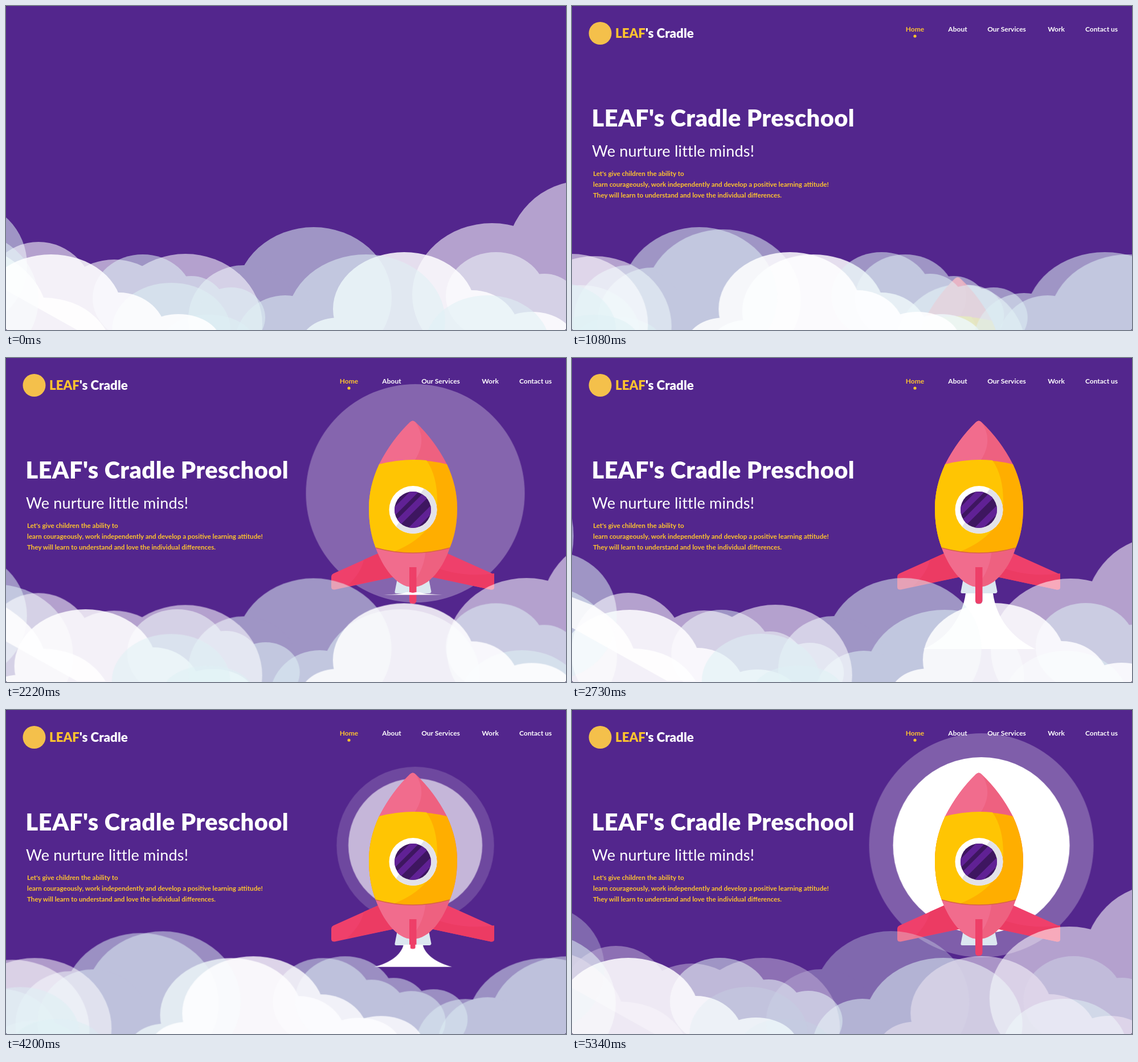
Write an HTML page without scripts that moves like this. It is 983x570 px and loops after 5.37 s.

```html
<!DOCTYPE html>
<html lang="en">
<head>
<meta charset="utf-8">
<title>Preschool hero</title>
<style>
html, body { margin: 0; width: 100%; height: 100%; overflow: hidden; background: #3a2a4a; }
svg { display: block; width: 983px; height: 570px; border-radius: 3px; background: #53268d; }
text { font-family: Lato, "Open Sans", sans-serif; fill: #fff; }
.gold { fill: #ffc42e; }
.brand { font-size: 22.3px; font-weight: 900; }
.nav { font-size: 12px; font-weight: 700; text-anchor: middle; }
.title { font-size: 41.5px; font-weight: 900; letter-spacing: .45px; }
.tagline { font-size: 27px; font-weight: 400; letter-spacing: .2px; }
.copy { font-size: 11.6px; font-weight: 700; }
.mist { fill: #dff0f5; opacity: .55; }
.blush { fill: #fff; opacity: .57; }
.puff { fill: #fff; opacity: .85; }

.copyblock, .badge, .ship, .halo, .core, .flame, .wide, .far, .under, .over {
  animation: 5370ms linear infinite;
}
.copyblock { animation-name: show; }
.badge { animation-name: badge; }
.ship { animation-name: rise; }
.halo { animation-name: halo; }
.core { animation-name: core; }
.flame { animation-name: burn; transform-origin: 714px 412px; }
.wide { animation-name: drift-wide; }
.far { animation-name: drift-far; }
.halo, .core { transform-origin: 718.5px 238px; }
/* the wide bank starts behind the far one, then moves in front */
.under { animation-name: leave; }
.over { animation-name: enter; }

@keyframes leave { 0%, 10% { visibility: visible; } 10.01%, 100% { visibility: hidden; } }
@keyframes enter { 0%, 10% { visibility: hidden; } 10.01%, 100% { visibility: visible; } }
@keyframes show { 0%, 1.67% { opacity: 0; } 11%, 100% { opacity: 1; } }
@keyframes badge { 0%, 11% { opacity: 0; } 16%, 100% { opacity: 1; } }
@keyframes rise {
  0%, 13% { transform: translate(-50px, 494px); }
  20.11% { transform: translate(-37px, 367px); }
  34.08% { transform: translate(-12px, 122px); }
  41%, 100% { transform: none; }
}
/* halo and core have a radius of 100, so scale reads as radius */
@keyframes halo {
  0%, 13% { transform: scale(.8); opacity: .6; }
  20.11% { transform: scale(1.15); opacity: .6; }
  34.08% { transform: scale(1.74); opacity: .66; }
  41.3% { transform: scale(1.92); opacity: .3; }
  48.5% { transform: scale(1.97); opacity: 0; }
  48.6%, 73.2% { transform: scale(.6); opacity: 0; }
  81.5% { transform: scale(1.89); opacity: .27; }
  84% { transform: scale(1.97); opacity: .26; }
  89.94% { transform: scale(1.26); opacity: 0; }
  99.44%, 100% { transform: scale(1.97); opacity: .26; }
}
@keyframes core {
  0%, 73.2% { transform: scale(.6); opacity: 0; }
  81.5% { transform: scale(1.55); opacity: 1; }
  89.94% { transform: scale(1.26); opacity: .71; }
  99.44%, 100% { transform: scale(1.55); opacity: 1; }
}
@keyframes burn {
  0%, 41% { transform: scale(.5, 0); }
  48.5%, 72.6% { transform: none; }
  82%, 100% { transform: scale(.5, 0); }
}
@keyframes drift-wide {
  0%, 1.67% { transform: translate(540px, 0); }
  20.11% { transform: translate(223px, 0); }
  34.08% { transform: translate(442px, -1px); }
  47.86% { transform: translate(627px, -2px); }
  50.84% { transform: translate(582px, -2px); }
  65.36% { transform: translate(392px, -1px); }
  76.13% { transform: translate(247px, 0); opacity: 1; }
  89.94% { transform: translate(433px, 2px); opacity: .65; }
  99.44% { transform: translate(560px, 0); opacity: .6; }
  100% { transform: translate(567px, 0); opacity: .6; }
}
@keyframes drift-far {
  0%, 1.67% { transform: translate(-80px, 4px); }
  20.11% { transform: translate(265px, 4px); }
  34.08% { transform: translate(72px, 8px); }
  47.86% { transform: translate(-101px, 10px); }
  50.84% { transform: translate(-58px, 10px); opacity: 1; }
  65.36% { transform: translate(130px, 7px); opacity: .85; }
  76.13% { transform: translate(266px, 4px); opacity: .95; }
  89.94% { transform: translate(72px, 0); opacity: 1; }
  99.44% { transform: translate(-60px, 3px); }
  100% { transform: translate(-67px, 3px); }
}
</style>
</head>
<body>
<svg viewBox="0 0 983 570" xmlns="http://www.w3.org/2000/svg">
  <defs>
    <clipPath id="pane"><circle cx="714" cy="267" r="32"/></clipPath>
    <clipPath id="rim"><circle cx="714.5" cy="267" r="42"/></clipPath>
    <clipPath id="hull">
      <path d="M709 113Q714 108 719 113Q752 144 774 187Q792 226 792 264Q792 303 779 334C768 367 744 403 714 403C685 403 661 367 649 334Q637 303 637 264Q637 226 655 187Q677 144 709 113Z"/>
    </clipPath>
    <path id="fin" d="M655 343L575 379Q571 381 571 385V403Q571 408 577 407.500L682 385Z" fill="#ef406b"/>

    <!-- one cloud bank; x is measured from the tallest middle cloud -->
    <g id="bank">
      <circle class="mist" cx="-735" cy="315" r="156"/>
      <circle class="mist" cx="-615" cy="455" r="112"/>
      <g class="mist">
        <ellipse cy="513" rx="137" ry="124"/>
        <ellipse cx="-122" cy="550" rx="98" ry="94"/>
      </g>
      <g class="blush">
        <ellipse cx="-225" cy="560" rx="135" ry="124"/>
        <ellipse cx="-350" cy="545" rx="105" ry="99"/>
        <ellipse cx="-483" cy="520" rx="100" ry="105"/>
      </g>
      <g class="blush">
        <ellipse cx="933" cy="504" rx="140" ry="126"/>
        <circle cx="1095" cy="440" r="137"/>
      </g>
      <g class="mist">
        <ellipse cx="320" cy="510" rx="88" ry="77"/>
        <ellipse cx="405" cy="530" rx="62" ry="59"/>
        <ellipse cx="475" cy="544" rx="60" ry="53"/>
      </g>
      <g class="mist">
        <ellipse cx="712" cy="550" rx="139" ry="117"/>
        <ellipse cx="570" cy="590" rx="88" ry="85"/>
      </g>
      <ellipse class="mist" cx="925" cy="595" rx="110" ry="90"/>
      <ellipse class="mist" cx="-250" cy="570" rx="104" ry="83"/>
      <ellipse class="mist" cx="-185" cy="590" rx="80" ry="47"/>
      <path class="puff" d="M-640 444L-415 570H-365Q-400 515 -474 513Q-490 470 -545 437L-640 400Z"/>
      <g class="puff">
        <ellipse cx="159" cy="533" rx="125" ry="100"/>
        <ellipse cx="278" cy="575" rx="83" ry="75"/>
        <ellipse cx="383" cy="590" rx="75" ry="52"/>
        <ellipse cx="45" cy="595" rx="68" ry="47"/>
      </g>
    </g>
  </defs>

  <g class="ship">
    <circle class="halo" cx="718.5" cy="238" r="100" fill="#fff"/>
    <circle class="core" cx="718.5" cy="238" r="100" fill="#fff"/>
    <path d="M687 388H742L746.500 411Q746 414 743 414H685Q682 414 682.500 411Z" fill="#dce7f0"/>
    <use href="#fin"/>
    <path d="M655 343L628 355Q624 378 598 402L682 385Z" fill="#ec3b63"/>
    <use href="#fin" transform="matrix(-1 0 0 1 1428 0)"/>
    <path d="M748 366Q797 387 857 379V403Q857 408 851 407.500L746 385Z" fill="#ec3b63"/>
    <g clip-path="url(#hull)">
      <rect x="630" y="105" width="170" height="300" fill="#ee6180"/>
      <path d="M630 105H713Q747 145 710 190H630Z" fill="#f16c8d"/>
      <path d="M630 330H737Q737 372 708 404H630Z" fill="#f16c8d"/>
      <path d="M630 194L655 187Q714 172 774 187L800 194V328L779 334Q714 352 649 334L630 328Z" fill="#ffae00"/>
      <path d="M630 194L655 187Q697 176 738 180Q757 207 757 253Q753 312 680 341L649 334L630 328Z" fill="#ffc503"/>
      <path d="M649 334Q714 352 779 334" fill="none" stroke="#d86547" stroke-width="1.5"/>
    </g>
    <g clip-path="url(#rim)">
      <rect x="670" y="223" width="88" height="88" fill="#fff"/>
      <path d="M738 224L682 300L690 315H760V224Z" fill="#e3e2e9"/>
    </g>
    <g clip-path="url(#pane)">
      <rect x="680" y="233" width="68" height="68" fill="#3e1660"/>
      <path d="M674 278L722 230M681 297L748 230M709 304L752 261" stroke="#602195" stroke-width="11"/>
    </g>
    <path d="M708 368H720.500V427Q720 432.500 714 432.500Q708 432.500 708 427Z" fill="#ee3f68"/>
  </g>

  <circle class="badge" cx="49.5" cy="48" r="20" fill="#f4c04b"/>
  <g class="copyblock">
    <text class="brand" x="76" y="55.500"><tspan class="gold">LEAF</tspan>'s Cradle</text>
    <g class="nav">
      <text class="gold" x="602" y="45">Home</text>
      <text x="677" y="45">About</text>
      <text x="763" y="45">Our Services</text>
      <text x="850" y="45">Work</text>
      <text x="929.5" y="45">Contact us</text>
    </g>
    <circle class="gold" cx="602" cy="53" r="2.600"/>
    <text class="title" x="34.500" y="211.500">LEAF's Cradle Preschool</text>
    <text class="tagline" x="35" y="264.500">We nurture little minds!</text>
    <g class="copy">
      <text class="gold" x="37" y="299">Let's give children the ability to</text>
      <text class="gold" x="37" y="318">learn courageously, work independently and develop a positive learning attitude!</text>
      <text class="gold" x="37" y="336.500">They will learn to understand and love the individual differences.</text>
    </g>
  </g>

  <g class="under"><g class="wide"><use href="#bank"/></g></g>
  <g class="far"><use href="#bank"/></g>
  <g class="flame">
    <path d="M691 414C685 458 658 494 617 512H813C772 492 745 458 739 414H720.500V427Q720 432.500 714 432.500Q708 432.500 708 427V414Z" fill="#fff"/>
  </g>
  <g class="over"><g class="wide"><use href="#bank"/></g></g>
</svg>
</body>
</html>
```
